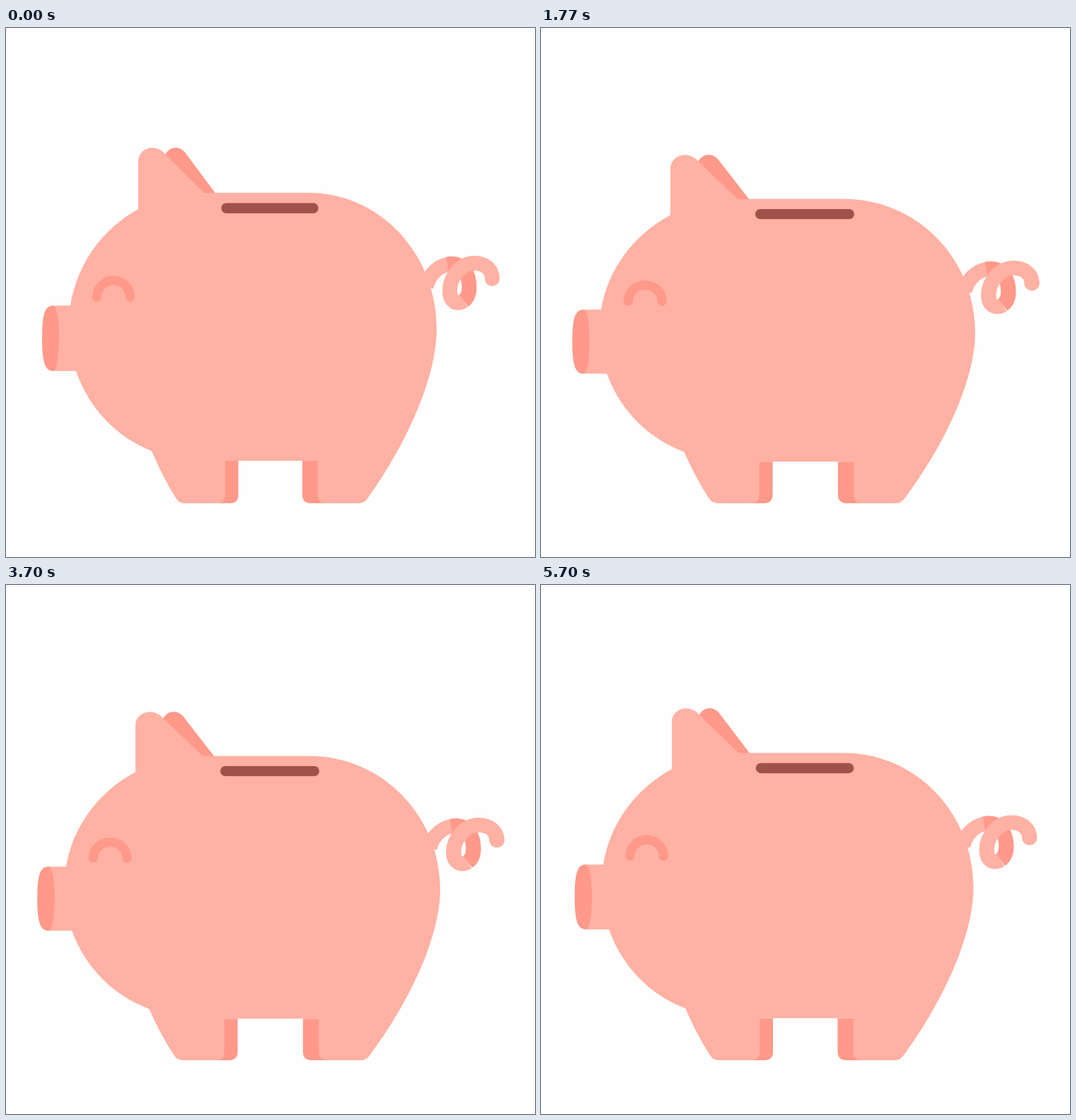
Write an HTML page that moves like this. It is 748 by 748 pixels and loops after 5730 ms.

```html
<!DOCTYPE html>
<html lang="en">
<head>
<meta charset="utf-8">
<title>Piggy bank</title>
<style>
  html, body { margin: 0; width: 100%; height: 100%; overflow: hidden; background: #fefefe; }
  svg { display: block; width: 100%; height: 100%; }
  .light { fill: #ffb1a4; }
  .dark { fill: #ff998a; }
  .tail { fill: none; stroke-width: 21; }
  .light-line { stroke: #ffb1a4; }
  .dark-line { stroke: #ff998a; }
</style>
</head>
<body>
<svg viewBox="0 0 748 748">
  <defs>
    <clipPath id="aboveSlot"><rect width="748" height="255"/></clipPath>
  </defs>
  <g id="pig">
    <!-- tail -->
    <path class="tail light-line" d="M594 366C599 347 613 333.5 633 333.5"/>
    <path class="tail dark-line" d="M624 334C648 330 655 350 655 367C655 376 652 382 647 386"/>
    <path class="tail light-line" d="M647 386C637 392.5 627.5 386 627.5 372C627.5 351 644 332.5 662 332.5C678 332.5 687.5 342 687.5 354.5"/>
    <circle class="light" cx="687.5" cy="354.5" r="10.5"/>
    <!-- far ear and legs -->
    <path class="dark" d="M224 182C229 167 245 165 254 177L296 233.5H265Z"/>
    <path class="dark" d="M300 612H328.500V660Q328.500 672 316.500 672H290Z"/>
    <path class="dark" d="M450 612H419V660Q419 672 431 672H460Z"/>
    <!-- body -->
    <path class="light" d="M187 256V189C187 170 211 162 225 178L280 233H428
      C528 233 609 319 609 425C609 500 560 597 512 664Q507 672 499 672H453Q441 672 441 660V612
      H310V660Q310 672 298 672H253Q245 672 241 666Q222 636 206 598
      C155 578 117 537 99 485H66V392.500H91C100 335 135 285 187 256Z"/>
    <path class="dark" d="M66 392.500C54 392.500 51 408 51 438.500S54 485 66 485C72 485 75 465 75 438.500S72 392.500 66 392.500Z"/>
    <path class="dark-line" d="M128.500 380.500A23.400 23.400 0 0 1 175.300 380.500" fill="none" stroke-width="13" stroke-linecap="round"/>
    <rect x="304.500" y="247.500" width="137" height="14.500" rx="7" fill="#a0524a"/>
  </g>
  <g clip-path="url(#aboveSlot)">
    <g id="coin">
      <circle r="56" fill="#ffd15c"/>
      <circle r="42" fill="#f7b84b"/>
    </g>
  </g>
  <path id="sparkle" d="M501 129Q511 162 545 172Q511 182 501 215Q491 182 459 172Q491 162 501 129Z" fill="#e0e0e0"/>
</svg>
<script>
  const LOOP = 5730, TICK = 100 / 3;
  // Each drop: coin appears, second bounce, settling, rest (ms).
  const DROPS = [
    [270, 800, 900, 970],
    [1200, 1770, 1870, 1930],
    [2170, 2730, 2800, 2900],
    [3130, 3700, 3770, 3870],
    [4100, 4670, 4730, 4800],
    [5070, 5600, 5700, 5730]
  ];
  const BOUNCE = 7, REST = 9;
  const COIN_Y = [40, 125, 215];
  const [pig, coin, sparkle] = ['pig', 'coin', 'sparkle'].map(id => document.getElementById(id));

  function poseAt(t) {
    const drop = DROPS.find(d => t >= d[0] && t < d[3]);
    if (!drop) return REST;
    const [start, bounce, settle] = drop;
    if (t >= settle) return BOUNCE + 1;
    if (t >= bounce) return BOUNCE;
    let pose = 0;
    const span = (bounce - start) / BOUNCE;
    while (pose < BOUNCE - 1 && t >= Math.floor((start + (pose + 1) * span) / TICK) * TICK) pose++;
    return pose;
  }

  // Hard impact, then a linear release; the second bounce is smaller.
  function squash(pose) {
    if (pose < 3) return 0;
    if (pose < BOUNCE) return 0.0515 * (6 - pose) / 3;
    return 0.021 * (REST - pose) / 2;
  }

  function draw(t) {
    const pose = poseAt(t), s = squash(pose);
    pig.setAttribute('transform',
      `translate(374.4 672) scale(${1 + s} ${1 - s * 0.96}) translate(-374.4 -672)`);
    const falling = pose < COIN_Y.length;
    coin.style.display = falling ? '' : 'none';
    if (falling) coin.setAttribute('transform', `translate(373 ${COIN_Y[pose]})`);
    sparkle.style.opacity = pose === 3 ? 0.4 : pose === 4 ? 0.06 : 0;
  }

  const begin = performance.now();
  function frame() {
    draw((performance.now() - begin) % LOOP);
    requestAnimationFrame(frame);
  }
  draw(0);
  requestAnimationFrame(frame);
</script>
</body>
</html>
```
